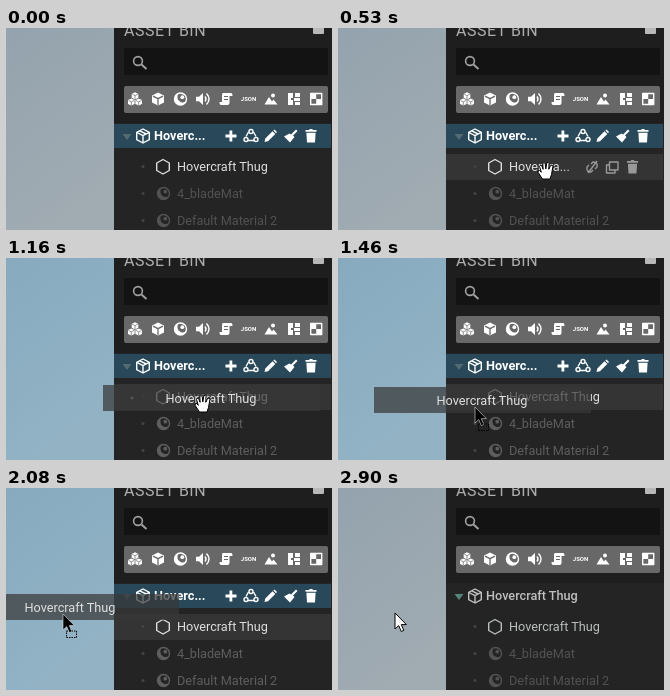
An HTML page for the animation above (4150 ms loop, 326 by 202 pixels).

```html
<!DOCTYPE html>
<html lang="en">
<head>
<meta charset="utf-8">
<title>Asset bin</title>
<style>
html, body { margin: 0; width: 100%; height: 100%; overflow: hidden; background: #222; }
svg { display: block; width: 100vw; height: 100vh; }
text { font: 12.7px Roboto, sans-serif; white-space: pre; }
.line { fill: none; stroke: currentColor; stroke-width: 1.4; stroke-linejoin: round; }
.solid { fill: currentColor; }
</style>
</head>
<body>
<svg viewBox="0 0 326 202">
  <defs>
    <linearGradient id="gray" x2=".4" y2="1"><stop stop-color="#94a3ae"/><stop offset="1" stop-color="#a0abb2"/></linearGradient>
    <linearGradient id="blue" x2=".4" y2="1"><stop stop-color="#87aabf"/><stop offset="1" stop-color="#93b3c5"/></linearGradient>
    <g id="cube">
      <path class="solid" d="M0-6.5 6-3.5V3.5L0 6.5-6 3.5V-3.5Z"/>
      <path d="M-5-2.8 0-.3 5-2.8M0 0V6" fill="none" stroke="#686868" stroke-width="1.3"/>
    </g>
    <path id="box" class="line" d="M0-7 6.3-3.7V3.7L0 7-6.3 3.7V-3.7ZM-6-3.5 0-.4 6-3.5M0 0V7M-3.2-5.2 3.2-2"/>
    <g id="ball">
      <circle class="line" r="6"/>
      <path class="solid" d="M-2-5.6A6 6 0 1 0 5.6 2Q3 4.5 0 3T-3-1Q-3.5-4-2-5.6Z"/>
      <circle class="solid" cx="1.8" cy="-1.8" r="1.9"/>
    </g>
    <path id="trash" class="solid" d="M-5.5-6H-2L-1.2-7H1.2L2-6H5.5V-4.2H-5.5ZM-4.6-3.2H4.6L4 6.5H-4Z"/>
    <path id="hand" fill="#fff" stroke="#000" d="M-3.5 8.5-7.8 2Q-8.3 0-6.5 0L-4.7 1.8-6.5-4Q-6-6-4.4-5L-2.9-1.2-3.2-7Q-2-8.8-.8-7L-.2-1.5.8-7.6Q2.2-8.9 3-7.2L2.8-1.2 4.7-5.2Q6.5-6 6.9-4L5.5 4 4 8.5Z"/>
    <path id="arrow" d="M0 0V16L3.7 12.6 6.3 18.5 8.8 17.4 6.3 11.6H11.4Z"/>
  </defs>

  <rect width="108" height="202" fill="url(#gray)"/>
  <rect id="sky" width="108" height="202" fill="url(#blue)"/>
  <rect x="108" width="218" height="202" fill="#1e1e1e"/>
  <rect x="108" y="95" width="218" height="107" fill="#242424"/>
  <text x="118" y="8" fill="#acacac" style="font-size:16px;letter-spacing:.5px">ASSET BIN</text>
  <path d="M307 0H318V5Q318 6 317 6H308Q307 6 307 5Z" fill="#b8b8b8"/>
  <rect x="118" y="20" width="204" height="27" rx="1" fill="#131313"/>
  <path d="M135.5 36.5 140.5 41" stroke="#a0a0a0" stroke-width="2"/>
  <circle cx="132" cy="33" r="4.4" fill="none" stroke="#a0a0a0" stroke-width="1.6"/>

  <rect x="118" y="58" width="204" height="27" rx="2" fill="#686868"/>
  <g color="#fff" transform="translate(0 71)">
    <use href="#cube" transform="translate(129 -3.2) scale(.55)"/>
    <use href="#cube" transform="translate(125.3 3) scale(.55)"/>
    <use href="#cube" transform="translate(132.7 3) scale(.55)"/>
    <use href="#cube" x="152"/>
    <use href="#ball" x="174.5"/>
    <path class="solid" d="M190-2.3H193L197-6V6L193 2.3H190Z"/>
    <path class="line" d="M199-2.5Q201 0 199 2.5M200.5-5.5Q205.5 0 200.5 5.5"/>
    <path class="solid" d="M217-6H225Q226.500-6 226.500-3H223.500V4Q223.500 6 221.500 6H215Q213.500 6 213.500 3H216V-4Q216-6 217-6ZM218-3V-2H222V-3ZM218 0V1H222V0Z" fill-rule="evenodd"/>
    <text class="solid" x="242.5" y="2.3" text-anchor="middle" style="font-size:6px;font-weight:700">JSON</text>
    <path class="solid" d="M258.500 5.500 263-2 266 2.500 267.500.5 271.500 5.500Z"/>
    <circle class="solid" cx="267" cy="-3.500" r="2"/>
    <path class="solid" d="M282-6H287V-1H285V1H287V6H282ZM289-6H294V-2H289ZM288-1H294V2H288ZM289 3H294V6H289Z"/>
    <path class="line" d="M304.700-5.500H315.700V5.500H304.700Z"/>
    <path class="solid" d="M304.700-5.500H310.200V0H304.700ZM310.200 0H315.700V5.500H310.200Z"/>
  </g>

  <rect id="bar" x="108" y="96" width="217" height="24" fill="#29495a"/>
  <path id="caret" d="M116.500 106H125.500L121 112Z"/>
  <g id="head">
    <use href="#box" x="137" y="108"/>
    <text id="title" class="solid" x="148" y="112"></text>
  </g>
  <g id="tools" color="#fff" transform="translate(0 108)">
    <path class="solid" d="M223.500-5.500H226.300V-1.400H230.500V1.400H226.300V5.500H223.500V1.400H219.500V-1.400H223.500Z"/>
    <path class="line" d="M242.500-4 240 .5M247.500-4 250 .5M242 4.500H248"/>
    <g class="line"><circle cx="245" cy="-4.500" r="2"/><circle cx="240" cy="3.500" r="2"/><circle cx="250" cy="3.500" r="2"/></g>
    <path class="solid" d="M258.500 6 259.300 2.500 266.500-4.700 269.300-1.900 262 5.200ZM267.300-5.500 268.500-6.500 271-4 270-2.700Z"/>
    <path class="solid" d="M290-6.500 291.500-5 287-.5 288.500 1 284 6.500 278 .5 283.500-2.500 285-1.500Z"/>
    <use href="#trash" x="305"/>
  </g>

  <rect id="hover" x="108" y="126" width="217" height="26" fill="#343434"/>
  <g fill="#444"><circle cx="137" cy="138.500" r="1.500"/><circle cx="137" cy="165.500" r="1.500"/><circle cx="137" cy="192.500" r="1.500"/></g>
  <g id="row">
    <path class="line" d="M157 131.500 163.300 135V142.500L157 146 150.700 142.500V135Z"/>
    <text id="item" class="solid" x="171" y="143"></text>
  </g>
  <g id="acts" color="#999" transform="translate(0 139)">
    <path class="line" d="M253-3 255-5Q260-5 259 0L257 2M255 3 253 5Q248 5 249 0L251-2M250 6 259-6"/>
    <path class="line" d="M271.500-5H280V3H271.500ZM271-2H268.500V6H277V3.500"/>
    <use href="#trash" x="294.500"/>
  </g>
  <g id="rest">
    <use href="#ball" x="157.500" y="165.500"/>
    <use href="#ball" x="157.500" y="192.500"/>
    <text class="solid" x="171" y="170">4_bladeMat</text>
    <text class="solid" x="171" y="197">Default Material 2</text>
  </g>

  <g id="ghost">
    <rect x="108" y="125" width="217" height="26" fill="#383838" opacity=".72"/>
    <circle cx="137" cy="138" r="1.500" fill="#555"/>
    <text id="label" x="170.500" y="143" fill="#e0e0e0"></text>
  </g>
  <g id="cursor">
    <use id="grab" href="#hand" x="-1" y="-1.500"/>
    <g id="carry">
      <use href="#arrow" fill="#000" stroke="#ddd" stroke-width=".6"/>
      <rect x="3.500" y="17" width="10" height="6.500" fill="none" stroke="#000" stroke-dasharray="1.500 1"/>
    </g>
    <use id="point" href="#arrow" fill="#fff" stroke="#000"/>
  </g>
</svg>
<script>
const $ = id => document.getElementById(id);
const LOOP = 4150, NAME = "Hovercraft Thug";
const HOME = [209, 145];
// pointer stops: time, x, y
const stops = [
  [140, 222, 190], [220, 217, 170], [300, 213, 154], [370, 212, 148], [530, 209, 144],
  [1080, 206, 145], [1160, 198, 147], [1230, 184, 148], [1310, 169, 149], [1390, 152, 149],
  [1460, 137, 149], [1540, 122, 148], [1610, 105, 144], [1690, 87, 139], [1770, 68, 131],
  [1840, 56, 126], [2080, 57, 126], [2770, 57, 125]
];
const show = (id, on) => $(id).style.display = on ? "" : "none";
const move = (id, x, y) => $(id).setAttribute("transform", `translate(${x} ${y})`);
$("label").textContent = NAME;

function draw(t) {
  const [, x, y] = stops.findLast(s => s[0] <= t) || [0, 0, 0];
  const within = (a, b) => t >= a && t < b;
  const dragging = within(1160, 2770);
  const over = within(220, 1160);
  const active = t < 2900;

  $("sky").style.opacity = within(1160, 2820) ? 1 : within(1080, 2900) ? .5 : 0;
  show("bar", active);
  show("tools", active);
  $("caret").style.fill = t < 2770 ? "#536a72" : "#55857b";
  $("head").style.color = active ? "#fff" : "#c0c0c0";
  $("title").textContent = active ? NAME.slice(0, 6) + "..." : NAME;
  $("title").style.fontWeight = active ? 700 : 500;

  show("hover", within(220, 2900));
  show("acts", over);
  $("item").textContent = over ? NAME.slice(0, 8) + "..." : NAME;
  $("row").style.color = active ? "#dedede" : "#b9c0bc";
  $("rest").style.color = dragging ? "#5e5e5e" : "#525252";

  show("ghost", dragging);
  move("ghost", x - HOME[0], y - HOME[1]);
  show("cursor", t >= 140);
  move("cursor", x, y);
  show("grab", within(220, 1230) || within(2770, 2900));
  show("carry", within(1230, 2770));
  show("point", within(140, 220) || !active);
}

const start = performance.now();
function tick() {
  draw((performance.now() - start) % LOOP);
  requestAnimationFrame(tick);
}
tick();
</script>
</body>
</html>
```
